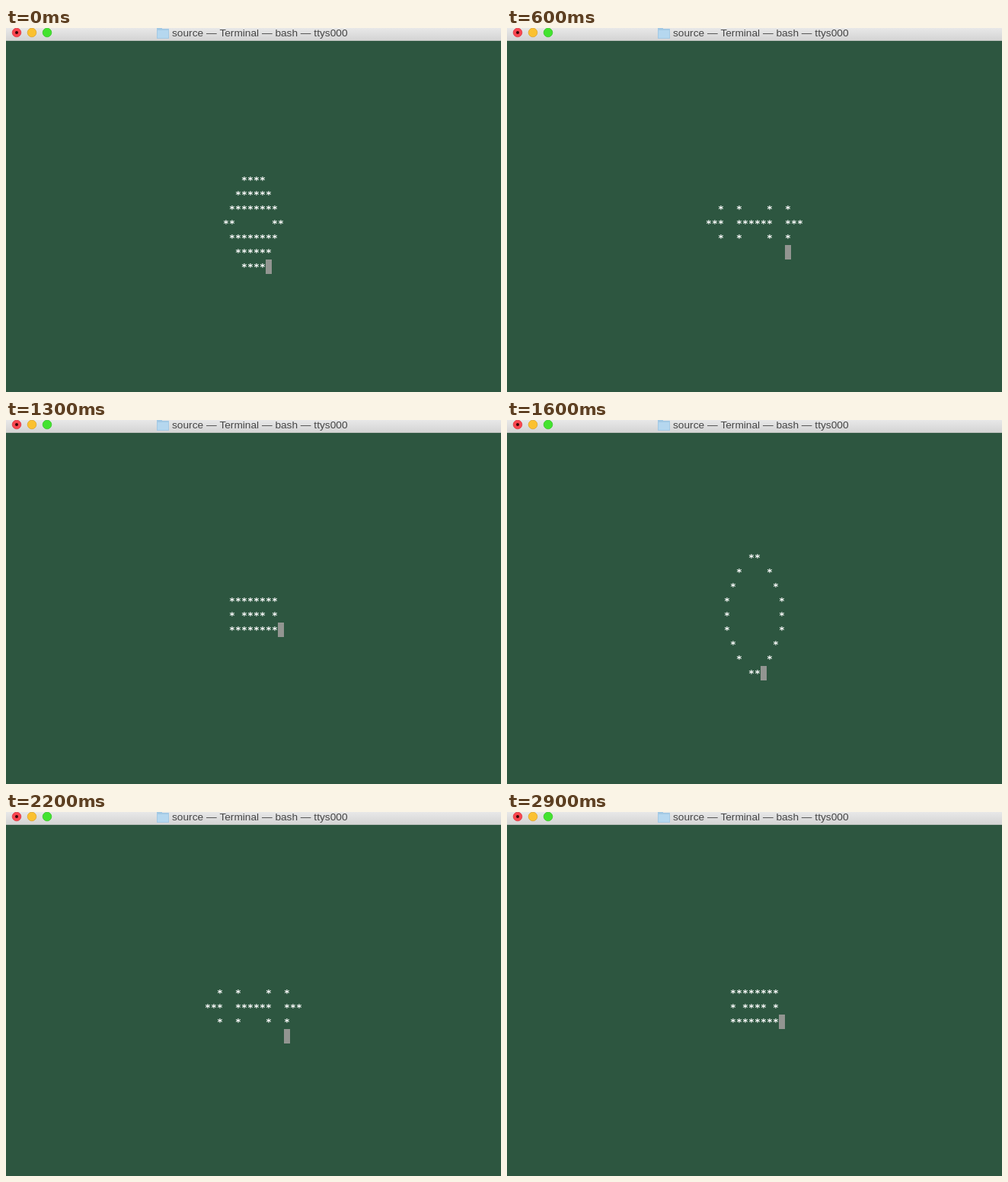
Recreate the animation shown at these times as an HTML page with a canvas. Size 650 by 478 pixels, loop 3 s.

```html
<!DOCTYPE html>
<html lang="en">
<head>
<meta charset="utf-8">
<title>Terminal life</title>
<style>
  html, body { margin: 0; width: 100%; height: 100%; overflow: hidden; background: #2d5640; }
  canvas { display: block; }
</style>
</head>
<body>
<canvas id="stage" width="650" height="478"></canvas>
<script>
const ctx = document.getElementById('stage').getContext('2d');
const COLS = 24, ROWS = 13;
const CELL_W = 8, CELL_H = 19, LEFT = 229, TOP = 133;
const STEP_MS = 100, STEPS = 30, STALL = 17; // the program stalls for one step

// Game of Life: a pentadecathlon, period 15
const seed = ['********', '* **** *', '********'];
const alive = (grid, r, c) => grid[r]?.[c] ? 1 : 0;

function evolve(grid) {
  return grid.map((row, r) => row.map((cell, c) => {
    let n = -cell;
    for (let y = r - 1; y <= r + 1; y++)
      for (let x = c - 1; x <= c + 1; x++) n += alive(grid, y, x);
    return n === 3 || (cell && n === 2) ? 1 : 0;
  }));
}

// The cursor rests just after the last cell that was rewritten
function cursorAfter(before, after) {
  let pos = null;
  after.forEach((row, r) => row.forEach((cell, c) => {
    if (cell !== before[r][c]) pos = { r, c: c + 1 };
  }));
  return pos;
}

let grid = Array.from({ length: ROWS }, (_, r) =>
  Array.from({ length: COLS }, (_, c) => seed[r - 5]?.[c - 8] === '*' ? 1 : 0));
const generations = [{ grid, cursor: null }];
while (generations.length <= STEPS) {
  const next = evolve(grid);
  generations.push({ grid: next, cursor: cursorAfter(grid, next) });
  grid = next;
}

function disc(x, y, radius, fill, stroke) {
  ctx.beginPath();
  ctx.arc(x, y, radius, 0, 2 * Math.PI);
  ctx.fillStyle = fill;
  ctx.fill();
  if (stroke) {
    ctx.strokeStyle = stroke;
    ctx.lineWidth = 0.8;
    ctx.stroke();
  }
}

function rect(x, y, w, h, fill) {
  ctx.fillStyle = fill;
  ctx.fillRect(x, y, w, h);
}

function drawTitleBar() {
  const shade = ctx.createLinearGradient(0, 0, 0, 17);
  shade.addColorStop(0, '#e8e8e8');
  shade.addColorStop(1, '#d3d3d3');
  rect(0, 0, 650, 17, shade);
  rect(0, 16, 650, 1, '#bcc1bd');

  disc(14, 6, 5.8, '#f9464f', '#dc3c46');
  disc(14, 6, 2, '#3a0508');
  disc(34, 6, 5.8, '#fbc130', '#dfa52c');
  disc(54, 6, 5.8, '#43e32f', '#38c42a');

  rect(198, 0, 7, 3, '#a3c9e4');
  rect(198, 1, 16, 13, '#a3c9e4');
  rect(199, 3, 14, 10, '#b5d7ef');

  ctx.font = '13.7px "Liberation Sans", Arial, sans-serif';
  ctx.textAlign = 'left';
  ctx.fillStyle = '#454545';
  ctx.fillText('source — Terminal — bash — ttys000', 218, 11);
}

function drawLife({ grid, cursor }) {
  rect(LEFT + cursor.c * CELL_W, TOP + cursor.r * CELL_H, CELL_W, CELL_H, '#929591');
  ctx.font = 'bold 13px "DejaVu Sans Mono", monospace';
  ctx.textAlign = 'center';
  ctx.fillStyle = '#fff';
  grid.forEach((row, r) => row.forEach((cell, c) => {
    if (cell) ctx.fillText('*', LEFT + (c + 0.5) * CELL_W, TOP + r * CELL_H + 14);
  }));
}

function draw() {
  const step = Math.floor(performance.now() / STEP_MS) % STEPS;
  rect(0, 0, 650, 478, '#2d5640');
  drawTitleBar();
  drawLife(generations[step + (step < STALL ? 2 : 1)]);
  requestAnimationFrame(draw);
}
draw();
</script>
</body>
</html>
```
